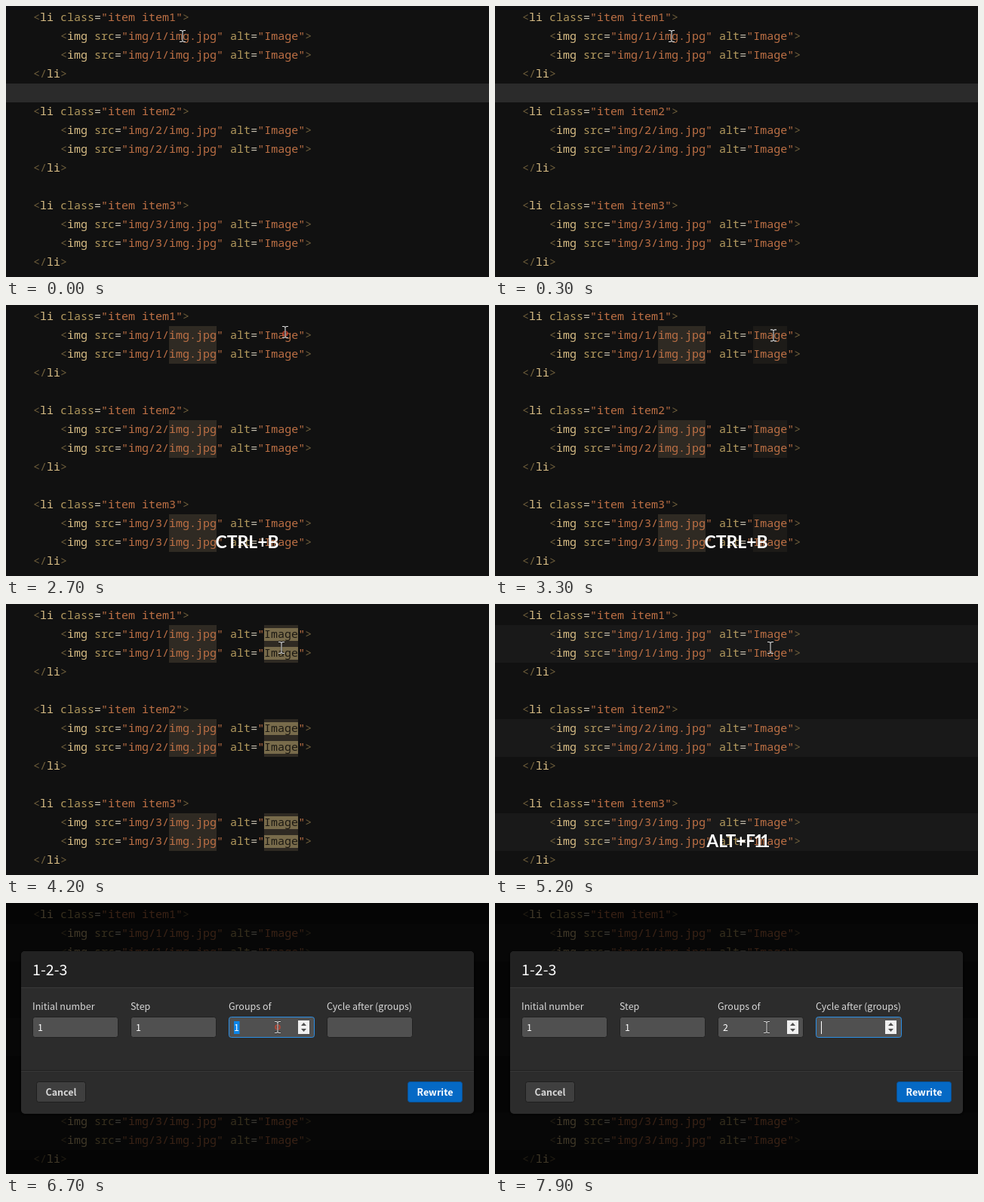
An HTML page that plays this animation: 640x360 px, repeating every 8 s.

```html
<!DOCTYPE html>
<html lang="en">
<head>
<meta charset="utf-8">
<title>Numbering selections in a code editor</title>
<style>
  html, body { margin: 0; width: 100%; height: 100%; overflow: hidden; background: #111; }
  svg { display: block; width: 640px; height: 360px; }
  text { white-space: pre; }
  .code { font: 15px "Noto Sans Mono", "DejaVu Sans Mono", monospace; }
  .ui { font: 500 12.5px "Noto Sans CJK JP", "Noto Sans CJK SC", "Noto Sans", sans-serif; fill: #d8d8d8; }
  .ui .title { font-size: 19.7px; font-weight: 400; fill: #fff; }
  .ui .value { fill: #fff; }
  .ui .button { font-weight: 700; text-anchor: middle; }
  .caption { font: 700 23px Lato, "Open Sans", sans-serif; fill: #fff; }
  .bracket { fill: #6f5f3c; }
  .tag { fill: #d9be86; }
  .attr { fill: #b39a5e; }
  .equal { fill: #c9c2b2; }
  .string { fill: #bd7045; }
</style>
</head>
<body>
<svg viewBox="0 0 640 360" xmlns="http://www.w3.org/2000/svg">
  <rect width="640" height="360" fill="#111"/>
  <rect id="activeLine" y="103" width="640" height="25" fill="#2b2b2b"/>
  <g id="activeRows" fill="#191919"></g>
  <g id="fileBands" fill="#2f2a23"></g>
  <g id="altBands" fill="#2f2a23"></g>
  <g id="code" class="code"></g>
  <g id="fileBars" class="code"></g>
  <g id="altBars" class="code"></g>
  <text id="ctrlB" class="caption" x="277.5" y="323">CTRL+B</text>
  <text id="altF" class="caption" x="280.5" y="323" style="font-size:22.5px">ALT+F<tspan dx="-2" letter-spacing="-5">11</tspan></text>
  <rect id="shade" width="640" height="360" fill="#000"/>
  <g id="dialog" class="ui">
    <rect x="18" y="63" width="604" height="220" rx="7" fill="#000" opacity=".35"/>
    <rect x="20" y="64" width="600" height="216" rx="5" fill="#2c2c2c"/>
    <path d="M20 112V69a5 5 0 0 1 5-5H615a5 5 0 0 1 5 5V112Z" fill="#222"/>
    <path d="M20 112.5H620" stroke="#383838"/>
    <path d="M20 222.5H620" stroke="#1f1f1f"/>
    <path d="M20 223.5H620" stroke="#383838"/>
    <text class="title" x="35" y="96">1-2-3</text>
    <g id="fields"></g>
    <rect x="40.5" y="237.5" width="65" height="27" rx="3" fill="#3f3f3f" stroke="#1e1e1e"/>
    <text class="button" x="73" y="256">Cancel</text>
    <rect x="532.5" y="237.5" width="72" height="27" rx="3" fill="#0569c5" stroke="#0b4f90"/>
    <text class="button" x="568.5" y="256" style="fill:#fff">Rewrite</text>
  </g>
  <circle id="ring" fill="#c8402c" fill-opacity=".3" stroke="#d8452e" stroke-width="1.6"/>
  <g id="pointer" fill="none">
    <path id="beam" d="M-4 -7.5H-1.5L0 -6.5L1.5 -7.5H4M0 -6.5V6.5M-4 7.5H-1.5L0 6.5L1.5 7.5H4" stroke="#111" stroke-width="2.4" opacity=".6"/>
    <use href="#beam" style="display:none"/>
    <path d="M-4 -7.5H-1.5L0 -6.5L1.5 -7.5H4M0 -6.5V6.5M-4 7.5H-1.5L0 6.5L1.5 7.5H4" stroke="#ddd" stroke-width="1.1"/>
  </g>
</svg>
<script>
const LOOP = 8000, STEP = 100, CHAR = 9, ROW = 25, LEFT = 36;
const $ = id => document.getElementById(id);
const clamp = v => Math.max(0, Math.min(1, v));
const ramp = (t, from, to) => clamp((t - from) / (to - from));
const ease = p => p * p * (3 - 2 * p);
const show = (id, alpha) => $(id).setAttribute("opacity", +alpha);

// Code listing
const span = (kind, s) => `<tspan class="${kind}">${s}</tspan>`;
const attr = (name, value) => " " + span("attr", name) + span("equal", "=") + span("string", `"${value}"`);
const open = (tag, attrs) => span("bracket", "&lt;") + span("tag", tag) + attrs + span("bracket", "&gt;");
const lineAt = (row, col, s) => `<text x="${LEFT + col * CHAR}" y="${20 + row * ROW}">${s}</text>`;
const imageRows = [1, 2, 6, 7, 11, 12];

let listing = "";
for (let n = 1; n <= 3; n++) {
  const row = (n - 1) * 5;
  const img = open("img", attr("src", `img/${n}/img.jpg`) + attr("alt", "Image"));
  listing += lineAt(row, 0, open("li", attr("class", `item item${n}`)))
    + lineAt(row + 1, 4, img) + lineAt(row + 2, 4, img)
    + lineAt(row + 3, 0, span("bracket", "&lt;/") + span("tag", "li") + span("bracket", "&gt;"));
}
$("code").innerHTML = listing;
$("activeRows").innerHTML = imageRows.map(r =>
  `<rect y="${3 + r * ROW}" width="640" height="${ROW}"/>`).join("");

// Matches of one word: dim bands below the text, bright bars above it
function addMatches(name, col, word) {
  const x = LEFT + col * CHAR, w = word.length * CHAR;
  $(name + "Bands").innerHTML = imageRows.map(r =>
    `<rect x="${x}" y="${3 + r * ROW}" width="${w}" height="${ROW}"/>`).join("");
  $(name + "Bars").innerHTML = imageRows.map(r =>
    `<rect x="${x}" y="${7 + r * ROW}" width="${w}" height="17" fill="#786b4b"/>`
    + `<g fill="#1b1812">${lineAt(r, col, word)}</g>`).join("");
}
addMatches("file", 20, "img.jpg");
addMatches("alt", 34, "Image");

// Dialog fields
$("fields").innerHTML = ["Initial number", "Step", "Groups of", "Cycle after (groups)"].map((label, i) => {
  const x = 35 + i * 130;
  return `<text x="${x}" y="142">${label}</text>
    <rect id="box${i}" x="${x + .5}" y="151.5" width="113" height="27" rx="3" fill="#505050"/>
    <rect id="pick${i}" x="${x + 7}" y="157" width="7.5" height="17" fill="#0a84e8"/>
    <text id="value${i}" class="value" x="${x + 7}" y="170"></text>
    <path id="caret${i}" d="M${x + 7.5} 157V174" stroke="#fff"/>
    <g id="spin${i}"><rect x="${x + 92}" y="156" width="15" height="18" fill="#f0f0f0"/>
      <path d="M${x + 96} 163h7l-3.5 -4zM${x + 96} 167h7l-3.5 4z" fill="#505050"/></g>`;
}).join("");

function drawFields(t) {
  const focus = t >= 7700 ? 3 : t >= 6600 ? 2 : -1;
  const values = ["1", "1", t >= 7300 ? "2" : "1", ""];
  values.forEach((value, i) => {
    $("value" + i).textContent = value;
    $("box" + i).setAttribute("stroke", i === focus ? "#2a8fe6" : "#222");
    show("pick" + i, i === 2 && t >= 6600 && t < 7300);
    show("caret" + i, i === 3 && focus === 3);
    show("spin" + i, i === focus || (i === 2 && t >= 6500));
  });
}

// Pointer stops: time, x, y
const stops = [
  [0, 234, 40], [700, 234, 40], [1600, 345, 48], [2150, 345, 48], [2600, 370, 36],
  [3100, 370, 36], [3800, 365, 58], [6200, 365, 58], [6600, 360, 165], [LOOP, 360, 165]
];
const clicks = [[600, 234, 40], [2650, 370, 38], [6650, 360, 165]];

function drawPointer(t) {
  const i = stops.findIndex(s => s[0] > t);
  const [t0, x0, y0] = stops[i - 1], [t1, x1, y1] = stops[i];
  const p = ease(ramp(t, t0, t1));
  $("pointer").setAttribute("transform", `translate(${x0 + (x1 - x0) * p} ${y0 + (y1 - y0) * p})`);

  const click = clicks.find(c => t >= c[0] && t < c[0] + 600);
  show("ring", 0);
  if (click) {
    const age = t - click[0], ring = $("ring");
    ring.setAttribute("cx", click[1]);
    ring.setAttribute("cy", click[2]);
    ring.setAttribute("r", 1 + age * .039);
    show("ring", .85 * (1 - age / 620));
  }
}

function drawDialog(t) {
  const p = ramp(t, 5200, 5700), scale = .905 + .095 * p;
  show("shade", .7 * p ** 1.6);
  show("dialog", clamp(p * 2.3));
  $("dialog").setAttribute("transform", `translate(320 172) scale(${scale}) translate(-320 -172)`);
}

function draw(t) {
  const selecting = t < 5000;
  show("activeLine", t < 600);
  show("activeRows", !selecting);
  show("fileBands", selecting ? ramp(t, 700, 1000) : 0);
  show("altBands", selecting ? ramp(t, 3100, 3600) : 0);
  show("fileBars", ramp(t, 700, 1000) * (1 - ramp(t, 1200, 1700)));
  show("altBars", ramp(t, 3900, 4200) * (1 - ramp(t, 4800, 5100)));
  show("ctrlB", ramp(t, 500, 800) * (1 - ramp(t, 3900, 4200)));
  show("altF", ramp(t, 4800, 5100) * (1 - ramp(t, 5700, 6100)));
  drawDialog(t);
  drawFields(t);
  drawPointer(t);
}

const start = performance.now();
function tick() {
  const t = (performance.now() - start) % LOOP;
  draw(Math.floor(t / STEP) * STEP);
  requestAnimationFrame(tick);
}
tick();
</script>
</body>
</html>
```
